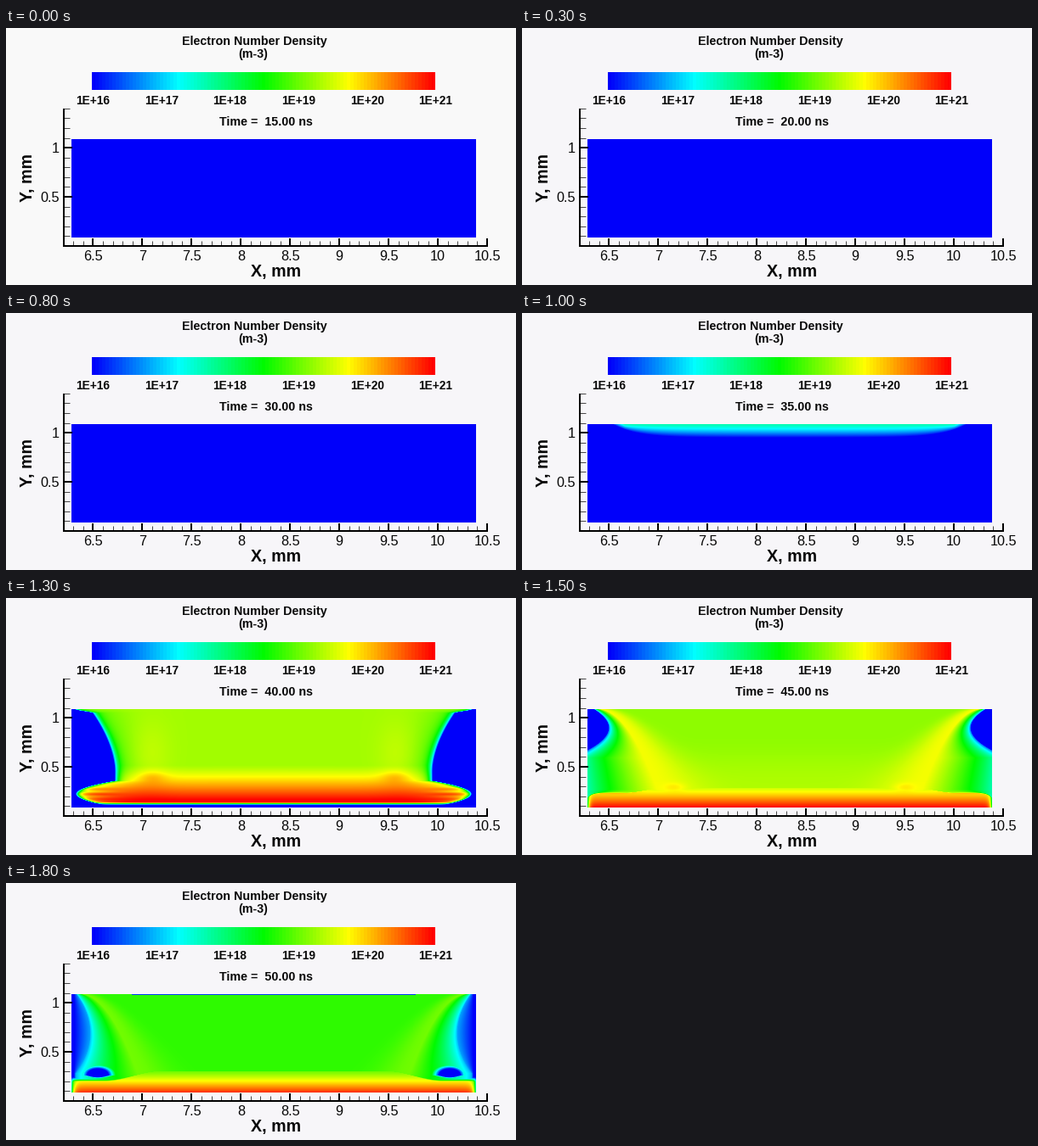
Animation of 600 by 303 pixels, one loop 2000 ms. Source, as a matplotlib script:

```python
import numpy as np
import matplotlib.pyplot as plt
from matplotlib.animation import FuncAnimation
from matplotlib.colors import LinearSegmentedColormap

W, H, DPI = 600, 303, 100
X0, X1, Y0, Y1 = 77, 553, 131, 247   # plotted domain in pixels
AXIS_X, AXIS_Y, SCALE = 67.7, 257, 115.9

rainbow = LinearSegmentedColormap.from_list(
    "rainbow", ["#0000fa", "#00ffff", "#00fa00", "#ffff00", "#ff0000"], N=512)

half = (X1 - X0) / 2
d = half - np.abs(np.arange(X1 - X0) + 0.5 - half)[None, :]   # from nearer side
h = np.arange(Y1 - Y0)[:, None] + 0.5                         # below upper side


def smooth(v, a, b):
    t = np.clip((v - a) / (b - a), 0, 1)
    return t * t * (3 - 2 * t)


def bump(v, mid, width):
    return np.exp(-((v - mid) / width) ** 2)


def rise(v, a, b, power=1.2):
    return np.clip((v - a) / (b - a), 0, 1) ** power


def quiet():
    return 0 * (d + h)


def onset():
    """Thin ionised layer under the upper boundary."""
    s = np.maximum(d - 30, 0)
    depth = 16 * (1 - np.exp(-s / 28)) + 1e-6
    return 0.33 * rise(s, -2, 14, 1) * np.clip(1 - (h / depth) ** 1.3, 0, 1)


def streamer():
    """Discharge reaching the lower boundary, blue side pockets left over."""
    core = 0.66 + 0.34 * rise(h, 66, 107)
    core = core * np.clip((113 - h) / 3, 0, 1)
    wall = (51 - 26 * rise(74 - h, 0, 69, 1.8)) * (0.15 + 0.85 * smooth(h, 0, 5))
    tip = 5 + 0.19 * (h - 100) ** 2
    s = np.maximum(d - np.minimum(wall, tip), 0)
    v = core * (1 - 0.8 * np.exp(-s / 3.5) - 0.2 * np.exp(-s / 20))
    v += 0.04 * bump(d, 90, 26) * bump(h, 55, 42)
    v += 0.05 * bump(d, 95, 16) * bump(h, 80, 7)
    return v + 0.05 * np.cos(h - 94) * bump(d, 24, 26) * bump(h, 98, 8) * (s > 2)


def spread():
    """Plasma fills the gap; a dense sheet lies on the lower boundary."""
    arc = 12 + 7.2 * np.sqrt(h)
    edge = np.maximum(25 - 0.036 * (h - 22) ** 2, -20)
    t = np.maximum((d - edge) / (arc - edge), 0)
    core = 0.64 + 0.03 * smooth(h, 30, 90)
    inner = core + (0.74 - core) * bump(d, arc, 12 + 0.45 * h)
    v = np.where(t < 1, 0.74 * np.sqrt(t), inner)
    top = 96 - 6 * smooth(d, 45, 90) + 6 * np.exp(-d / 6)
    sheet = 0.68 + 0.32 * rise(h, 90, 116)
    sheet = sheet * np.clip((h - top) / 3, 0, 1) * (1 - 0.6 * np.exp(-d / 2))
    v = np.maximum(v, sheet)
    return v + 0.08 * bump(d, 32, 20) * bump(h, 98, 1.8) \
        + 0.04 * bump(d, 103, 12) * bump(h, 92, 5)


def decay():
    """Fading plasma with widening side gaps and a low-density spot."""
    arc = 10 + 7 * np.sqrt(h)
    edge = np.maximum(22 - 0.0075 * (h - 46) ** 2, 5)
    t = np.clip((d - edge) / (arc - edge), 0, 1)
    gap = 0.16 * np.clip((d - 3) / (edge - 3), 0, 1)
    outer = gap + 0.45 * t ** 0.65
    inner = 0.545 + 0.065 * bump(d, arc, 10 + 0.3 * h)
    v = np.where(t < 1, outer, inner)
    r = np.hypot((d - 31) / 13, (h - 95) / 7.5) + np.maximum(h - 95.5, 0) / 4
    v = np.minimum(v, np.maximum(0, (r - 0.95) * 0.75))
    top = 98 - 12 * smooth(d, 40, 105)
    sheet = 0.56 + 0.4 * rise(h, 86, 116)
    sheet = sheet * np.clip((h - top) / 5, 0, 1) * (1 - 0.7 * np.exp(-d / 2.5))
    return np.where((h < 1.5) & (d > 71), 0.06, np.maximum(v, sheet))


fields = [quiet()] * 4 + [onset(), streamer(), spread(), decay()]

fig = plt.figure(figsize=(W / DPI, H / DPI), dpi=DPI)
ax = fig.add_axes([0, 0, 1, 1])
ax.axis("off")


def label(px, py, s, size=14.2, weight="bold", ha="center", va="baseline", **kw):
    return ax.text(px, py, s, fontsize=size * 72 / DPI, fontweight=weight, ha=ha,
                   va=va, family="Liberation Sans", color="#080808", **kw)


def line(xs, ys, width):
    ax.plot(xs, ys, color="black", lw=width * 72 / DPI, solid_capstyle="butt")


def picture(values, extent):
    return ax.imshow(values, cmap=rainbow, vmin=0, vmax=1, extent=extent,
                     aspect="auto", interpolation="nearest", zorder=1)


label(292.7, 20, "Electron Number Density")
label(291, 34.5, "(m-3)")
clock = label(306, 115, "")

picture(np.linspace(0, 1, 101)[None, :], (101, 505, 73, 52))
for i in range(6):
    label(102 + 80.7 * i, 90, f"1E+{16 + i}", 13.8)

field = picture(fields[0], (X0, X1, Y1, Y0))

line([AXIS_X - 1, 567], [AXIS_Y, AXIS_Y], 2)
line([AXIS_X, AXIS_X], [95, AXIS_Y + 1], 2)
for k in range(62, 106):
    px = AXIS_X + (k / 10 - 6.2) * SCALE
    major = k % 5 == 0
    line([px, px], [AXIS_Y, AXIS_Y - (9 if major else 6)], 2 if major else 0.7)
    if major:
        label(px, 273.5, f"{k / 10:g}", 16.3, "normal")
for k in range(15):
    py = AXIS_Y - k / 10 * SCALE
    major = k in (5, 10)
    line([AXIS_X, AXIS_X + (10 if major else 7)], [py, py], 2 if major else 0.7)
    if major:
        label(62.5, py + 6, f"{k / 10:g}", 16.3, "normal", ha="right")
label(317.5, 292.5, "X, mm", 19.7)
label(25, 176.5, "Y, mm", 19.7, va="center", rotation=90)

ax.set_xlim(0, W)
ax.set_ylim(H, 0)


def update(n):
    step = n // 5 * 2 + (n % 5 >= 3)   # stages alternate 300 ms and 200 ms
    field.set_data(fields[step])
    clock.set_text(f"Time =  {15 + 5 * step:.2f} ns")
    fig.set_facecolor("#f9f9f9" if step == 0 else "#f7f6f9")
    return field, clock


anim = FuncAnimation(fig, update, frames=20, interval=100, repeat=True, blit=False)
plt.show()
```
